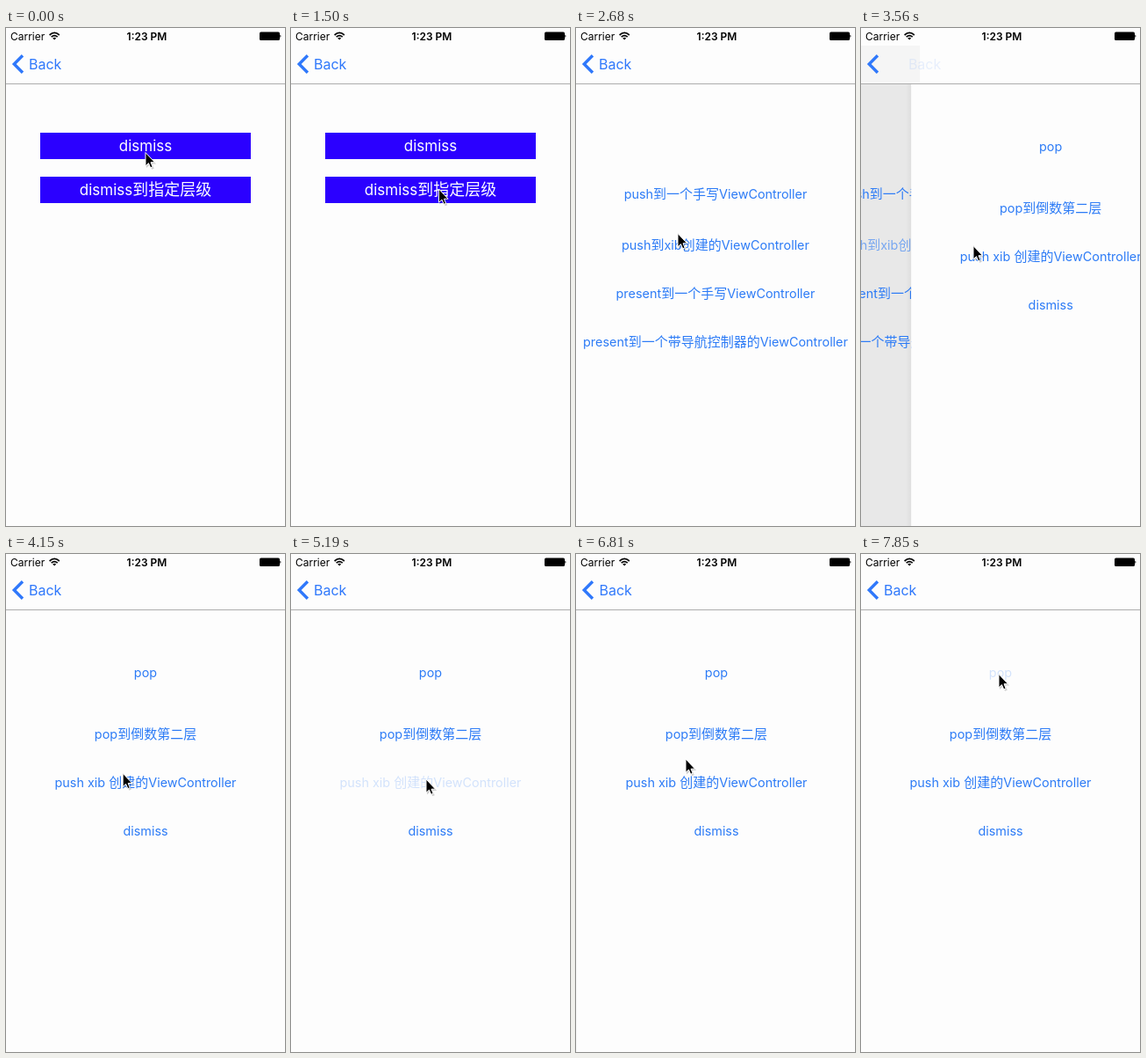
Animation, 318 px wide and 566 px high, one loop 8 s. Source, as an HTML page:

```html
<!DOCTYPE html>
<html lang="zh">
<head>
<meta charset="utf-8">
<style>
html, body { margin: 0; width: 100%; height: 100%; overflow: hidden; background: #fdfdfd; }
svg { display: block; width: 318px; height: 566px; font-family: Inter, "Noto Sans CJK SC", "Noto Sans CJK", sans-serif; }
.link { fill: #2c7bf6; }
.back { fill: #2f78fb; font-size: 16px; }
</style>
</head>
<body>
<svg id="stage" viewBox="0 0 318 566">
  <defs>
    <linearGradient id="edge">
      <stop offset="0" stop-color="#000" stop-opacity=".01"/>
      <stop offset="1" stop-color="#000" stop-opacity=".04"/>
    </linearGradient>
    <g id="chevron"><path d="M19 31.3 9.3 41 19 50.7" fill="none" stroke="#2f78fb" stroke-width="3.4"/></g>
  </defs>
  <rect width="318" height="566" fill="#fdfdfd"/>

  <rect id="dim" width="318" height="566"/>
  <g id="under">
    <g id="list"></g>
    <g id="detailUnder"></g>
  </g>
  <g id="over">
    <rect x="-5" y="64" width="5" height="502" fill="url(#edge)"/>
    <rect width="318" height="566" fill="#fdfdfd"/>
    <g id="detailOver"></g>
  </g>

  <g id="nav">
    <rect width="318" height="63" fill="#fdfdfd"/>
    <rect id="wash" y="20" height="43" opacity=".03"/>
    <use href="#chevron"/>
    <text id="oldBack" class="back" x="26" y="47">Back</text>
    <text id="newBack" class="back" x="26" y="47">Back</text>
    <rect y="63" width="318" height="1" fill="#adadad"/>
  </g>

  <g id="modal">
    <rect width="318" height="566" fill="#fdfdfd"/>
    <use href="#chevron"/>
    <text class="back" x="26" y="47">Back</text>
    <rect y="63" width="318" height="1" fill="#adadad"/>
    <rect x="39" y="119" width="240" height="30" fill="#2b00ff"/>
    <rect x="39" y="169" width="240" height="30" fill="#2b00ff"/>
  </g>

  <g id="status" fill="#000">
    <text x="5" y="13.7" font-size="12">Carrier</text>
    <g fill="none" stroke="#000" stroke-width="1.7">
      <path d="M49.6 8Q55.2 2.9 60.8 8"/>
      <path d="M51.7 10.1Q55.2 7 58.7 10.1"/>
    </g>
    <path d="M55.2 13.6 53.2 11.6Q55.2 10 57.2 11.6Z"/>
    <text x="160.5" y="13.7" font-size="12" font-weight="600" text-anchor="middle">1:23 PM</text>
    <rect x="289" y="4.6" width="23" height="9.4" rx="1.6"/>
    <path d="M312.4 7.6Q314.4 9.3 312.4 11Z"/>
  </g>

  <g id="cursor">
    <path d="M1 2V17.5L4.8 14 7.2 19.3 9.8 18.2 7.5 13H12.2Z" opacity=".18"/>
    <path d="M0 0V15.3L3.5 12.1 5.7 17.3 8.1 16.3 6 11.2H10.6Z" fill="#000" stroke="#fff" stroke-width="1"/>
  </g>
</svg>
<script>
const $ = id => document.getElementById(id);
const NS = 'http://www.w3.org/2000/svg';
const LOOP = 8000, TICK = 148, LAST = 53, W = 318, H = 566;

// Centred label; Latin and Chinese runs have their own sizes.
function label(parent, str, y, latin, cjk, fill) {
  const text = document.createElementNS(NS, 'text');
  text.setAttribute('x', 159);
  text.setAttribute('y', y);
  text.setAttribute('text-anchor', 'middle');
  if (fill) text.setAttribute('fill', fill);
  else text.setAttribute('class', 'link');
  for (const run of str.match(/[\u4e00-\u9fff]+|[^\u4e00-\u9fff]+/g)) {
    const span = document.createElementNS(NS, 'tspan');
    span.setAttribute('font-size', run.charCodeAt(0) > 255 ? cjk : latin);
    span.textContent = run;
    text.appendChild(span);
  }
  parent.appendChild(text);
  return text;
}
const links = (id, rows) => rows.map(([str, y]) => label($(id), str, y + 5.7, 14.4, 15));

const listRows = [
  ['push到一个手写ViewController', 188], ['push到xib创建的ViewController', 246],
  ['present到一个手写ViewController', 301], ['present到一个带导航控制器的ViewController', 356]
];
const detailRows = [
  ['pop', 134], ['pop到倒数第二层', 204],
  ['push xib 创建的ViewController', 259], ['dismiss', 314]
];
const list = links('list', listRows);
const low = links('detailUnder', detailRows);
const high = links('detailOver', detailRows);
label($('modal'), 'dismiss', 140, 17, 18, '#fff');
label($('modal'), 'dismiss到指定层级', 190, 17, 18, '#fff');

// Times below are in ticks.
const DISMISS = 12.75;
const PUSHES = [22.84, 35.8, 43.05];
const PRESSES = [[34.5, 35.8, 2], [42.5, 43.05, 2], [52.5, 54, 0]];
const PATH = [
  [0, 159, 141.5], [1, 159, 152], [2, 159, 150], [4, 156, 135], [5, 156, 135],
  [7, 160, 156], [9, 172, 196], [10, 168.5, 183], [12, 168, 185], [14, 162, 190],
  [18, 116, 233.5], [20, 127, 248.5], [21, 127.5, 247.5], [24, 128, 247.5], [27, 129, 248],
  [33, 154, 256], [37, 154, 256], [41, 132, 257], [43, 130, 256], [46, 125, 233],
  [49, 140, 180], [52, 157, 137], [53, 157, 136.5]
];

const clamp = v => Math.max(0, Math.min(1, v));
const move = (id, x, y) => $(id).setAttribute('transform', `translate(${x.toFixed(2)} ${y.toFixed(2)})`);
const alpha = (el, v) => el.setAttribute('opacity', clamp(v));
const show = (id, on) => $(id).setAttribute('display', on ? 'inline' : 'none');

// Critically damped spring from 0 to 1.
function spring(ticks) {
  const x = Math.max(0, ticks) * TICK / 1000 * 18.26;
  return 1 - (1 + x) * Math.exp(-x);
}

function pointer(n) {
  let i = 1;
  while (i < PATH.length - 1 && PATH[i][0] < n) i++;
  const [t0, x0, y0] = PATH[i - 1], [t1, x1, y1] = PATH[i];
  const k = clamp((n - t0) / (t1 - t0));
  return [x0 + (x1 - x0) * k, y0 + (y1 - y0) * k];
}

function draw(ms) {
  const n = Math.min(LAST, Math.floor(ms / TICK));
  const step = PUSHES.filter(t => t <= n).length - 1;
  const since = step < 0 ? 0 : n - PUSHES[step];
  const p = since > 3.5 ? 1 : spring(since);
  const moving = p > 0 && p < .99;

  show('under', p < .99);
  show('dim', moving);
  show('list', step < 1);
  show('detailUnder', step > 0);
  show('over', step >= 0);
  move('under', -.3 * W * p, 0);
  move('over', W * (1 - p), 0);
  alpha($('dim'), .1 * p);

  const fade = .2 + .345 * since;
  alpha(list[1], step < 0 ? 1 : fade);
  alpha(low[2], fade);
  high.forEach((el, i) => {
    const held = PRESSES.some(([a, b, row]) => row === i && n >= a && n < b);
    alpha(el, held ? .2 : 1);
  });

  show('wash', moving);
  $('wash').setAttribute('width', Math.min(W, W * (1 - p) + 10));
  move('oldBack', -60 * p, 0);
  alpha($('oldBack'), 1 - 2 * p);
  move('newBack', 155 * (1 - p), 0);
  alpha($('newBack'), (p - .8) * 5);

  const down = spring(n - DISMISS);
  show('modal', down < .998);
  move('modal', 0, H * down);
  move('cursor', ...pointer(n));
}

function loop(now) {
  draw(now % LOOP);
  requestAnimationFrame(loop);
}
draw(0);
requestAnimationFrame(loop);
</script>
</body>
</html>
```
